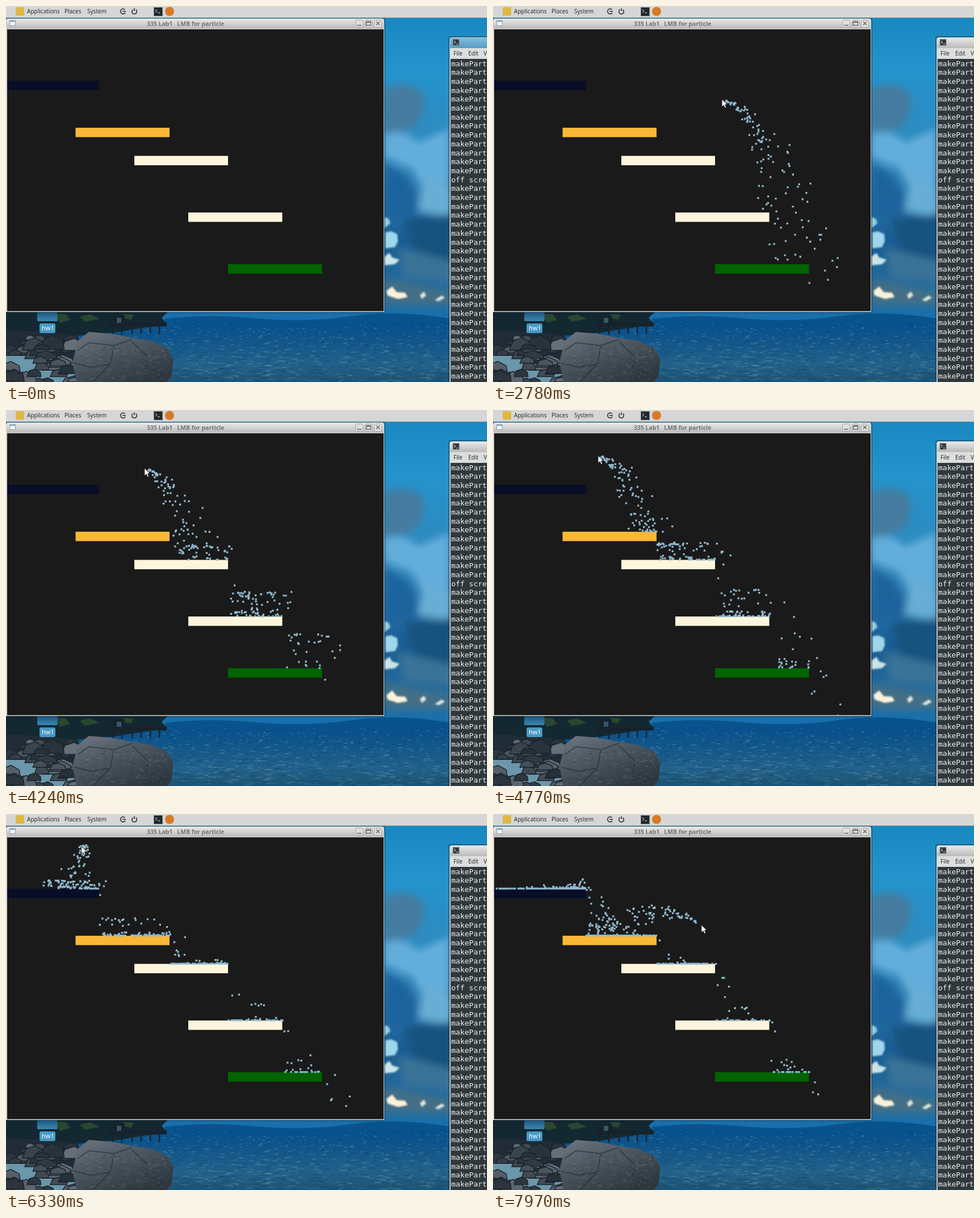
An HTML page for the animation above (8000 ms loop, 847 by 661 pixels).

```html
<!DOCTYPE html>
<html lang="en">
<head>
<meta charset="utf-8">
<title>Particle waterfall</title>
<style>
html, body { margin: 0; width: 100%; height: 100%; overflow: hidden; background: #1a1a1a; }
svg { display: block; }
text { font: 10px "Noto Sans", "Open Sans", sans-serif; fill: #2e2e2e; white-space: pre; }
.title { font-weight: bold; font-size: 10.4px; fill: #757575; }
.term text { font: 13px "DejaVu Sans Mono", monospace; fill: #f0f0ee; }
</style>
</head>
<body>
<svg id="stage" width="847" height="661" viewBox="0 0 847 661">
  <defs>
    <linearGradient id="sky" x2="0" y2="1">
      <stop offset="0" stop-color="#1786bf"/><stop offset=".2" stop-color="#2493cc"/>
      <stop offset=".5" stop-color="#3187ba"/><stop offset=".74" stop-color="#195c92"/>
      <stop offset=".9" stop-color="#256f9f"/><stop offset="1" stop-color="#1370b2"/>
    </linearGradient>
    <linearGradient id="sea" x2="0" y2="1">
      <stop offset="0" stop-color="#07508e"/><stop offset=".3" stop-color="#11568a"/>
      <stop offset=".7" stop-color="#22618a"/><stop offset="1" stop-color="#1d5271"/>
    </linearGradient>
    <linearGradient id="stone" x2=".7" y2="1">
      <stop offset="0" stop-color="#717783"/><stop offset=".4" stop-color="#505b65"/>
      <stop offset="1" stop-color="#2d3740"/>
    </linearGradient>
    <linearGradient id="bar" x2="0" y2="1">
      <stop offset="0" stop-color="#e9e9e9"/><stop offset="1" stop-color="#b9b9b9"/>
    </linearGradient>
    <linearGradient id="activeBar" x2="0" y2="1">
      <stop offset="0" stop-color="#82bddb"/><stop offset="1" stop-color="#559dc5"/>
    </linearGradient>
    <linearGradient id="folder" x2="0" y2="1">
      <stop offset="0" stop-color="#1d587f"/><stop offset="1" stop-color="#3b86b2"/>
    </linearGradient>
    <filter id="soft" x="-50%" y="-50%" width="200%" height="200%"><feGaussianBlur stdDeviation="7"/></filter>
    <filter id="fine" x="-50%" y="-50%" width="200%" height="200%"><feGaussianBlur stdDeviation="1.5"/></filter>
    <clipPath id="view"><rect x="2" y="41" width="663" height="495.5"/></clipPath>
    <clipPath id="seaClip"><rect y="552" width="847" height="109"/></clipPath>
  </defs>

  <rect width="847" height="562" fill="url(#sky)"/>
  <g filter="url(#soft)">
    <path d="M666 145 Q700 130 732 150 Q745 185 715 215 L666 225Z" fill="#457c9f"/>
    <path d="M666 225 Q705 215 725 240 L781 215 V350 L735 325 L715 285 L666 265Z" fill="#63addb"/>
    <path d="M666 275 L705 300 L740 365 L666 375Z" fill="#1b649d"/>
    <path d="M735 300 L785 320 V372 L725 360Z" fill="#68aed4"/>
    <path d="M700 375 L790 365 V455 L722 440Z" fill="#16527f"/>
    <path d="M690 425 L790 450 V485 L700 478Z" fill="#3a7398"/>
    <path d="M666 480 L790 505 V525 H666Z" fill="#446e85"/>
  </g>
  <g filter="url(#fine)">
    <path d="M666 371 l8 3 3 8 -11 9Z" fill="#95cce4"/>
    <path d="M668 398 l10 -2 11 5 1 13 -5 10 -17 2Z" fill="#9ed7eb"/>
    <path d="M666 441 l9 -7 5 8 13 4 -8 8 -19 2Z" fill="#c9e4e4"/>
    <path d="M670 501 l10 -8 8 10 15 1 4 8 -17 3 -18 -6Z" fill="#fbf2db"/>
    <path d="M729 508 l7 -6 4 7 -8 6Z M755 517 l12 -8 6 4 -11 6Z" fill="#dce6dc"/>
  </g>
  <path d="M280 550 Q350 541 440 549 T610 545 T790 551 V562 H280Z" fill="#09538d"/>
  <rect y="557" width="847" height="104" fill="url(#sea)"/>
  <g id="waves" fill="none" clip-path="url(#seaClip)"></g>

  <path d="M0 538 H285 L274 548 L284 560 L240 566 L190 574 L120 580 L0 600Z" fill="#142831"/>
  <path d="M85 541 l20 1 8 10 -18 5Z M130 546 l18 -4 17 8 -26 5Z M208 541 l17 2 -5 8 -18 -3Z" fill="#27482f"/>
  <path d="M182 558 H282 V562 H182Z M190 545 h18 v14 h-18Z M188 562 v18 M204 562 v16 M222 562 v15 M238 562 v14 M254 562 v14 M270 562 v14" fill="#17222b" stroke="#17222b" stroke-width="2.5"/>
  <path d="M195 548 h8 v9 h-8Z" fill="#34586a"/>
  <path d="M0 570 L40 572 L125 578 L160 661 H0Z" fill="#202d38"/>
  <path d="M0 615 Q50 608 100 622 L128 645 L98 661 H0Z" fill="#6c96aa"/>
  <g id="rocks"></g>
  <path d="M117 626 L127 588 L146 573 L184 576 L220 583 L257 589 L284 601 L295 621 L291 652 L283 661 H124Z" fill="url(#stone)"/>
  <path d="M126 606 L146 592 L190 597 L222 586 M190 597 L184 629 L153 661 M222 590 L250 617 L243 661 M120 628 L150 635 L181 630" fill="none" stroke="#28323b" stroke-width="2" opacity=".65"/>
  <g id="grain" opacity=".35"></g>

  <path d="M55 538 h35.500 v15 q0 1 -1 1 h-33.500 q-1 0 -1 -1Z" fill="url(#folder)"/>
  <rect x="59" y="558" width="28" height="17" rx="3" fill="#4999c4"/>
  <text x="63" y="570" style="font-size:11px;fill:#fff">hw1</text>

  <rect width="847" height="20.500" fill="#d6d6d6"/>
  <rect y="20" width="847" height="1" fill="#9aa7ac"/>
  <rect x="17" y="2" width="15" height="15" rx="2" fill="#dfb744"/>
  <text x="37" y="13">Applications</text>
  <text x="103" y="13">Places</text>
  <text x="143" y="13">System</text>
  <g fill="none" stroke="#2b2b2b" stroke-width="1.500">
    <path d="M209.500 6.500 A4.500 4.500 0 1 0 210 12 M205 9.500 H211"/>
    <path d="M223.300 6.400 A4.300 4.300 0 1 0 228.700 6.400 M226 4 V9"/>
  </g>
  <rect x="260.500" y="2.500" width="15" height="15" fill="#20272d" stroke="#6f777b"/>
  <path d="M263 6 l3 2.500 -3 2.500 M267 12 h4" fill="none" stroke="#eee"/>
  <circle cx="288" cy="9.500" r="8" fill="#d97928"/>

  <rect x="-4" y="21" width="672" height="519" rx="4" fill="#123" opacity=".35"/>
  <path d="M0 26 Q0 22 4 22 H662 Q666 22 666 26 V538 H0Z" fill="#d5d7d6"/>
  <path d="M1 27 Q1 23 5 23 H661 Q665 23 665 27 V40 H1Z" fill="url(#bar)"/>
  <rect x="6.500" y="25.500" width="10" height="9" fill="#eef2f4" stroke="#91a0a9"/>
  <rect x="7" y="26" width="9" height="2" fill="#8fb3c8"/>
  <text class="title" x="248" y="34.500">335 Lab1   LMB for particle</text>
  <g fill="#dedede" stroke="#a5a5a5">
    <rect x="615.500" y="24.500" width="13" height="13" rx="2"/>
    <rect x="632.500" y="24.500" width="13" height="13" rx="2"/>
    <rect x="648.500" y="24.500" width="13" height="13" rx="2"/>
  </g>
  <path d="M618 34 h8 M634.500 27.500 h8 v6.500 h-8Z M634.500 28.500 h8 M652 27.500 l6 6 M658 27.500 l-6 6" fill="none" stroke="#666" stroke-width="1.400"/>
  <rect x="2" y="41" width="663" height="495.500" fill="#1a1a1a"/>
  <g clip-path="url(#view)">
    <g id="shelves"></g>
    <path id="particles" fill="#8fb8ce"/>
  </g>

  <g class="term">
    <path d="M779 661 V57 Q779 53 783 53 H847 V661Z" fill="#123" opacity=".4"/>
    <path d="M781 661 V59 Q781 55 785 55 H847 V661Z" fill="#c4cbce"/>
    <path id="termBar" d="M782 74 V60 Q782 56 786 56 H847 V74Z"/>
    <rect x="787" y="58.500" width="11" height="11" fill="#30383d" stroke="#889298"/>
    <path d="M789 61 l3 2.500 -3 2.500 M793 67 h3" fill="none" stroke="#eee"/>
    <rect x="782" y="74" width="65" height="19" fill="#dcdddd"/>
    <rect x="783" y="93" width="64" height="568" fill="#30383c"/>
    <g id="lines"></g>
  </g>
  <text x="788" y="87">File</text>
  <text x="814" y="87">Edit</text>
  <text x="841" y="87">View</text>
  <path id="cursor" d="M0 0 V13.500 L3.200 10.600 L5.400 15.500 L7.800 14.500 L5.700 9.700 L9.600 9.400Z" fill="#fff" stroke="#111" stroke-width=".9"/>
</svg>
<script>
const LOOP = 8000, STEP = 46.37, PHASE = 40, SUBSTEPS = 3;
const GRAVITY = 305, BOUNCE = 0.48, SPREAD = 50, RATE = 98;
const EMIT_START = 1450, EMIT_LAG = 55, BLUR_TIME = 1410;

// Left, right, top and colour, from the highest shelf down.
const SHELVES = [
  [-2, 164, 131.5, '#080d28'],
  [122.5, 288, 214, '#fbb836'],
  [226, 391, 263.5, '#fef6dc'],
  [321, 486.5, 363, '#fef6dc'],
  [391, 556.5, 454, '#006400']
];
// Time, x and y of the pointer.
const POINTER = [
  [850, 860, 330], [1270, 560, 219], [1410, 558, 218], [2220, 474, 192],
  [2780, 402.500, 163.500], [3000, 372, 151], [3670, 301, 124],
  [4640, 199, 85], [4770, 185, 80], [5470, 97, 64], [5560, 100, 64],
  [5710, 124, 63], [6000, 136, 56], [6350, 132, 57], [6650, 144, 65],
  [7010, 196, 95], [7970, 367, 195]
];

const $ = id => document.getElementById(id);

function add(parent, tag, attrs, text = '') {
  const node = document.createElementNS('http://www.w3.org/2000/svg', tag);
  for (const key in attrs) node.setAttribute(key, attrs[key]);
  node.textContent = text;
  $(parent).append(node);
}

function randomizer(seed) {
  return (low, high) => {
    seed = (Math.imul(seed, 1664525) + 1013904223) >>> 0;
    return low + (high - low) * seed / 4294967296;
  };
}

function pointerAt(time) {
  let i = 1;
  while (i < POINTER.length - 1 && time > POINTER[i][0]) i++;
  const [t0, x0, y0] = POINTER[i - 1], [t1, x1, y1] = POINTER[i];
  const k = Math.max(0, (time - t0) / (t1 - t0));
  return [x0 + (x1 - x0) * k, y0 + (y1 - y0) * k];
}

function drawScenery() {
  const random = randomizer(21);
  for (const color of ['#073f70', '#4f8dac', '#123f61', '#7ca9b8', '#2d739d']) {
    let d = '';
    for (let i = 0; i < 240; i++) {
      const depth = random(0, 1), length = 3 + depth * random(3, 16);
      d += `M${random(150, 790)} ${559 + depth * 102}q${length / 2} ${-1 - depth * 2} ${length} 0`;
    }
    add('waves', 'path', { d, stroke: color, opacity: 0.45, 'stroke-width': 1.1 });
  }
  for (let i = 0; i < 46; i++) {
    const x = random(-8, 122), y = 577 + random(0, 1) * 84, w = random(8, 21), h = w * random(0.35, 0.65);
    const tone = Math.round(random(38, 105));
    const body = `M${x - w} ${y + h}l${w * 0.3} ${-h * 1.4} ${w * 0.8} ${-h * 0.5} ${w * 0.8} ${h * 0.8} ${w * 0.1} ${h * 1.1}Z`;
    add('rocks', 'path', { d: body, fill: `rgb(${tone},${tone + 9},${tone + 18})`, stroke: '#18232d', 'stroke-width': 1.5 });
  }
  for (const color of ['#9a9da3', '#1e2931']) {
    let d = '';
    for (let i = 0; i < 130; i++) d += `M${random(128, 285)} ${random(600, 658)}l${random(1, 6)} ${random(-2, 2)}`;
    add('grain', 'path', { d, stroke: color, fill: 'none' });
  }
}

function drawWindows() {
  for (const [left, right, top, fill] of SHELVES)
    add('shelves', 'rect', { x: left, y: top, width: right - left, height: 16.5, fill });
  for (let row = 0; row < 36; row++)
    add('lines', 'text', { x: 784, y: 105.5 + row * 15.7 }, row === 13 ? 'off screen' : 'makeParticle');
}

function moveParticle(p, dt) {
  p.vy += GRAVITY * dt;
  p.x += p.vx * dt;
  p.y += p.vy * dt;
  // A shelf has no underside: drifting beneath one lifts the particle onto it.
  const shelf = SHELVES.find(([left, right, top]) => p.x > left && p.x < right && p.y > top);
  if (shelf) {
    p.y = shelf[2];
    p.vy *= -BOUNCE;
  }
}

function simulate() {
  const random = randomizer(335), frames = [], dt = STEP / SUBSTEPS;
  let particles = [], due = 0;
  for (let time = PHASE; time < LOOP; time += STEP) {
    for (let s = 0; s < SUBSTEPS; s++) {
      const now = time - STEP + (s + 1) * dt;
      if (now >= EMIT_START) due += RATE * dt / 1000;
      for (const p of particles) moveParticle(p, dt / 1000);
      for (; due >= 1; due--) {
        const [x, y] = pointerAt(now - EMIT_LAG);
        particles.push({
          x: x + random(-1, 3), y: y + random(-1, 3),
          vx: random(-SPREAD, SPREAD), vy: random(-SPREAD, SPREAD) * 0.7
        });
      }
    }
    particles = particles.filter(p => p.x > 0 && p.y < 540);
    frames.push(particles.map(p =>
      `M${(p.x - 1.65).toFixed(1)} ${(p.y - 2).toFixed(1)}h3.3v3.3h-3.3z`).join(''));
  }
  return frames;
}

drawScenery();
drawWindows();
const frames = simulate();

function render(now) {
  const time = now % LOOP;
  const index = Math.floor((time - PHASE) / STEP);
  const [x, y] = pointerAt(PHASE + index * STEP);
  $('particles').setAttribute('d', frames[Math.max(0, index)] || '');
  $('cursor').setAttribute('transform', `translate(${x.toFixed(1)} ${y.toFixed(1)})`);
  $('cursor').setAttribute('visibility', time < 850 ? 'hidden' : 'visible');
  $('termBar').setAttribute('fill', time < BLUR_TIME ? 'url(#activeBar)' : 'url(#bar)');
}

const start = performance.now();
function tick() {
  render(performance.now() - start);
  requestAnimationFrame(tick);
}
tick();
</script>
</body>
</html>
```
